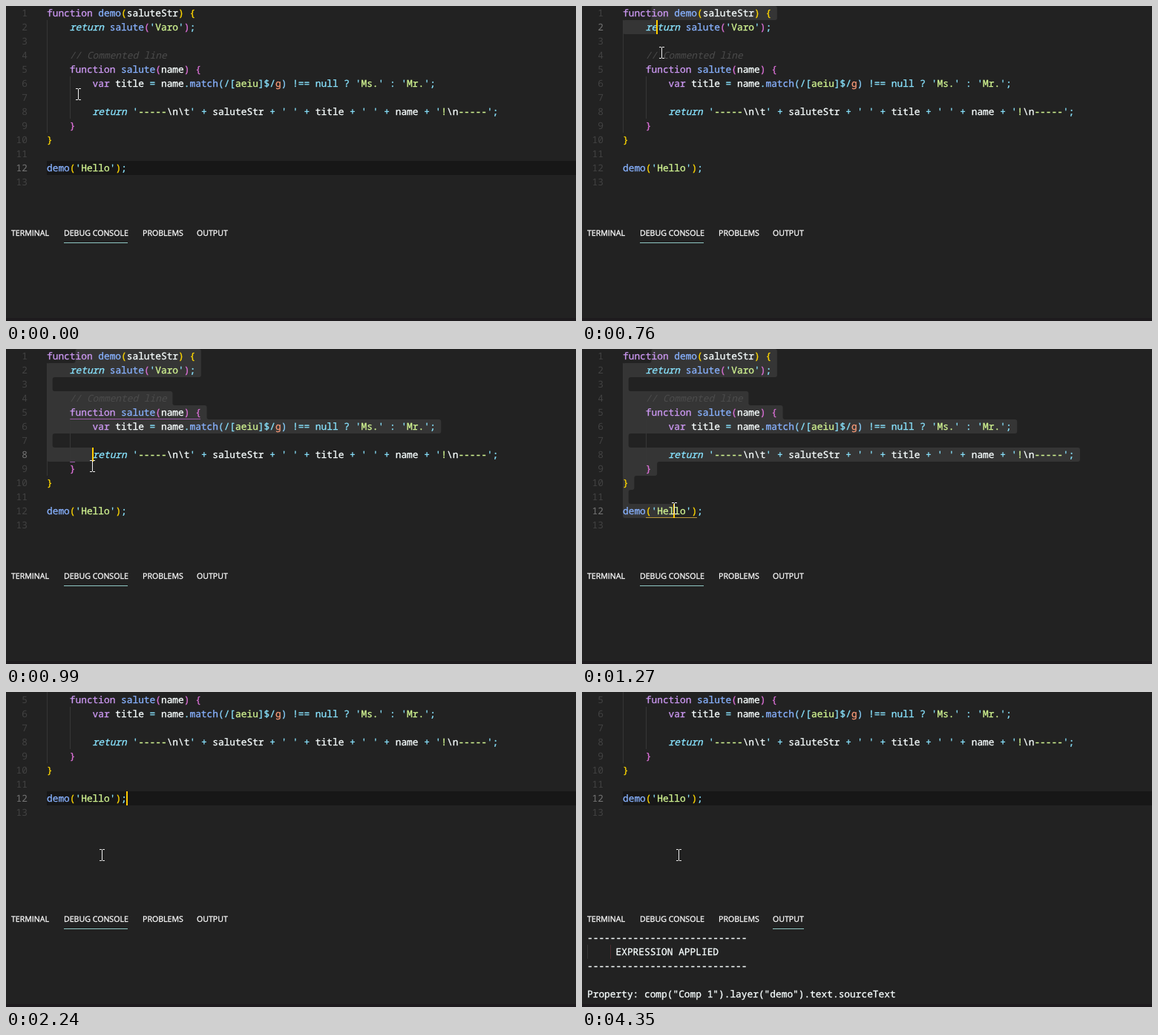
These frames come from a looping animation (768x425 px, 5.67 s). An HTML page:

```html
<!DOCTYPE html>
<html lang="en">
<head>
<meta charset="utf-8">
<title>Editor demo</title>
<style>
html, body { margin: 0; width: 100%; height: 100%; overflow: hidden; background: #222; }
#stage { position: relative; width: 768px; height: 425px; overflow: hidden; background: #222; }
#stage div, #stage svg { position: absolute; }
#editor { left: 0; top: 0; width: 768px; height: 290px; }
.mono, .tab { white-space: pre; text-rendering: geometricPrecision; -webkit-text-stroke: .3px currentColor; }
.mono { font: 12.83px/19px "Noto Sans Mono", "DejaVu Sans Mono", monospace; color: #f8ffff; }
.num { left: 0; width: 29px; text-align: right; color: #424242; -webkit-text-stroke: 0; }
.num.on { color: #747474; }
.guide { width: 1px; background: #363636; }
.caret { width: 2px; height: 19px; background: #fc0; }
#current { left: 55px; top: 209px; width: 713px; height: 19px; background: #171717; }
#shapes { left: 0; top: 0; overflow: visible; }
.key { color: #cc98f2; }
.ret { color: #89e4ff; font-style: italic; }
.fn { color: #88b2ff; }
.op { color: #89e4ff; }
.str { color: #d2f592; }
.flag { color: #f79a78; }
.com { color: #4c4c4c; font-style: italic; -webkit-text-stroke: 0; }
.b0 { color: #ffd700; }
.b1 { color: #da70d6; }
.b2 { color: #87cefa; }
.tab { top: 297px; font: 10.6px/20px "Open Sans", "Noto Sans", sans-serif; color: #fff; }
#line { top: 319px; height: 1px; background: #8fc8c4; }
#foot { left: 0; top: 421px; width: 768px; height: 4px; background: #1e1b1e; }
</style>
</head>
<body>
<div id="stage">
  <div id="editor">
    <div id="current"></div>
    <svg id="shapes" width="768" height="290" fill="none">
      <path id="sel" fill="#353535"/>
      <path id="scope" stroke="#9a5aa8" d="M262 94.5H86.5V152.5H93"/>
      <path id="pair" stroke="#b8963a" d="M86 227.5H155"/>
    </svg>
    <div class="guide" style="left:55px;top:19px;height:152px"></div>
    <div class="guide" style="left:86px;top:95px;height:57px"></div>
    <div id="code"></div>
    <div id="caret" class="caret"></div>
  </div>
  <div id="tabs"></div>
  <div id="line"></div>
  <div id="out">
    <div class="guide" style="left:7px;top:341px;height:19px"></div>
    <div class="guide" style="left:38px;top:341px;height:19px;background:#4a2c30"></div>
    <div class="mono" id="log" style="left:7px;top:322px"></div>
  </div>
  <div id="prompt" class="caret" style="left:7px;top:322px;background:#ddd"></div>
  <div id="foot"></div>
  <svg id="mouse" width="7" height="16" fill="none" stroke="#eee" style="left:0;top:0">
    <path d="M0 .5H3M4 .5H7M3.5 1V15M0 15.5H3M4 15.5H7"/>
  </svg>
</div>
<script>
const LOOP = 5670, ROW = 19, LEFT = 55, CHAR = 7.7, ANCHOR = 5;
const $ = id => document.getElementById(id);
const colX = c => LEFT + c * CHAR;

const lines = String.raw`function demo(saluteStr) {
    return salute('Varo');

    // Commented line
    function salute(name) {
        var title = name.match(/[aeiu]$/g) !== null ? 'Ms.' : 'Mr.';

        return '-----\n\t' + saluteStr + ' ' + title + ' ' + name + '!\n-----';
    }
}

demo('Hello');
`.split('\n');

// --- syntax colouring ---
const TOKEN = /(?<com>\/\/.*)|(?<rx>\/\[\w+\]\$\/g)|(?<str>'[^']*')|\b(?<key>function|var)\b|\b(?<ret>return)\b|\b(?<nul>null)\b|(?<fn>\w+)(?=\()|(?<br>[(){}])|(?<op>[^\s\w])/g;
const span = (cls, text) => `<span class="${cls}">${text}</span>`;
let depth = 0;

function paint(line) {
  return line.replace(TOKEN, (text, ...rest) => {
    const g = rest.pop();
    const kind = Object.keys(g).find(k => g[k] !== undefined);
    if (kind === 'br') {
      return span('b' + ('({'.includes(text) ? depth++ : --depth) % 3, text);
    }
    if (kind === 'str') {
      const body = text.slice(1, -1).replace(/\\\w/g, '</span>$&<span class="str">');
      return span('op', "'") + span('str', body) + span('op', "'");
    }
    if (kind === 'rx') {
      return span('op', '/[') + span('str', text.slice(2, -4)) + span('op', ']$/') + span('flag', 'g');
    }
    return span(kind === 'nul' ? 'op' : kind, text);
  });
}

$('code').innerHTML = lines.map((line, i) => {
  const top = `top:${i * ROW}px`;
  return `<div class="mono num" style="${top}">${i + 1}</div>` +
    `<div class="mono" style="${top};left:${LEFT}px">${paint(line)}</div>`;
}).join('');
const nums = document.querySelectorAll('.num');

// --- panel ---
const tabs = [['TERMINAL', 7], ['DEBUG CONSOLE', 78], ['PROBLEMS', 184], ['OUTPUT', 257]];
$('tabs').innerHTML = tabs.map(([name, x]) => `<div class="tab" style="left:${x}px">${name}</div>`).join('');
const rule = '-'.repeat(28);
$('log').textContent = [rule, '     EXPRESSION APPLIED', rule, '',
  'Property: comp("Comp 1").layer("demo").text.sourceText'].join('\n');

// --- pointer: time, x, y ---
const path = [
  [0, 97, 119], [50, 97, 118], [200, 99, 90], [400, 97, 45], [560, 94, 16], [610, 94, 13],
  [660, 96, 20], [710, 101, 36], [760, 107, 63], [810, 110, 88], [840, 112, 118], [890, 113, 135],
  [1000, 116, 160], [1220, 123, 210], [1270, 124, 215], [1420, 125, 223], [1580, 125, 219],
  [1730, 125, 219], [1780, 126, 219], [1860, 128, 220], [2090, 128, 220], [2140, 129, 220],
  [2710, 129, 220], [2760, 129, 219], [4250, 129, 219], [4300, 130, 219], [4350, 130, 220],
  [LOOP, 130, 220]
];

// The pointer is sampled every 50 ms.
function pointer(t) {
  let i = path.length - 2;
  while (path[i][0] > t) i--;
  const [t0, x0, y0] = path[i], [t1, x1, y1] = path[i + 1];
  const k = Math.floor((t - t0) / 50) * 50 / (t1 - t0);
  return [Math.round(x0 + (x1 - x0) * k), Math.round(y0 + (y1 - y0) * k)];
}

// While dragging, the caret trails the pointer by one sample.
function dragCaret(t) {
  const [x, y] = pointer(Math.min(t - 50, 1220));
  const row = Math.floor(y / ROW);
  const col = Math.min(lines[row].length, Math.round((x - LEFT) / CHAR));
  return { row, col };
}

function roundPath(pts, r) {
  const toward = (a, b) => {
    const d = Math.hypot(b[0] - a[0], b[1] - a[1]) || 1;
    const k = Math.min(r / d, 0.5);
    return [a[0] + (b[0] - a[0]) * k, a[1] + (b[1] - a[1]) * k];
  };
  return pts.map((p, i) => {
    const prev = pts.at(i - 1), next = pts[(i + 1) % pts.length];
    return `${i ? 'L' : 'M'}${toward(p, prev)}Q${p} ${toward(p, next)}`;
  }).join('') + 'Z';
}

function selection({ row, col }) {
  if (row === 0) return '';
  const start = colX(ANCHOR), last = col ? row : row - 1;
  const pts = [[start, 0]];
  for (let i = 0; i <= last; i++) {
    const right = colX(i < row ? lines[i].length + 1 : col);
    pts.push([right, i * ROW], [right, (i + 1) * ROW]);
  }
  if (last > 0) pts.push([LEFT, (last + 1) * ROW], [LEFT, ROW]);
  pts.push([start, ROW]);
  return roundPath(pts, 3);
}

const show = (id, on) => { $(id).style.visibility = on ? 'visible' : 'hidden'; };

function draw(t) {
  const dragging = t >= 660 && t < 2240;
  const applied = t >= 2240;
  const output = t >= 2290;
  const pos = dragging ? dragCaret(t) : { row: 11, col: 14 };

  $('editor').style.transform = `translateY(${applied ? -75 : 0}px)`;
  show('current', !dragging);
  $('sel').setAttribute('d', dragging ? selection(pos) : '');
  show('scope', dragging && pos.row > 4 && pos.row < 9);
  show('pair', dragging && pos.row === 11);
  nums.forEach((n, i) => n.classList.toggle('on', i === pos.row));

  $('caret').style.left = Math.round(colX(pos.col)) - (pos.col ? 1 : 0) + 'px';
  $('caret').style.top = pos.row * ROW + 'px';
  show('caret', (t >= 660 && t < 1780) || (applied && !output));

  $('line').style.left = (output ? 257 : 78) + 'px';
  $('line').style.width = (output ? 42 : 86) + 'px';
  show('prompt', t >= 2340 && t < 2510);
  show('out', t >= 3040);

  const [x, y] = pointer(t);
  $('mouse').style.transform = `translate(${x - 3}px, ${y - 8}px)`;
}

const begin = performance.now();
function tick() {
  draw((performance.now() - begin) % LOOP);
  requestAnimationFrame(tick);
}
tick();
</script>
</body>
</html>
```
